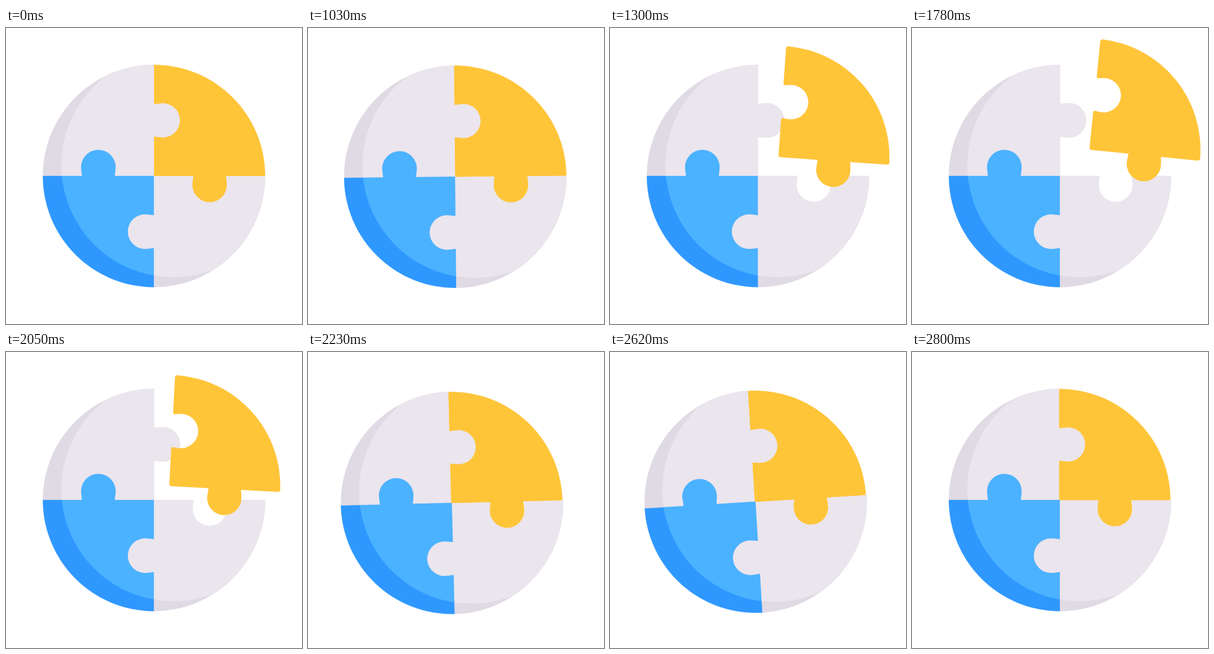
Animation, 500 px wide and 500 px high, one loop 2.83 s. Source, as an HTML page:

```html
<!DOCTYPE html>
<html lang="en">
<head>
<meta charset="utf-8">
<title>Puzzle circle</title>
<style>
  html, body { margin: 0; width: 100%; height: 100%; overflow: hidden; background: #fff; }
  svg { display: block; width: 100%; height: 100%; }

  .disc, .loose, .sharp { animation: 2830ms linear infinite; }
  .disc { animation-name: push, tilt; }
  .loose { animation-name: slide, turn; }
  .sharp { animation-name: corners; animation-timing-function: step-end; }

  .grey { fill: #ebe5ed; stroke: #ebe5ed; }
  .grey-dark { fill: #e0dae4; stroke: #e0dae4; }
  .blue { fill: #4bb2ff; stroke: #4bb2ff; }
  .blue-dark { fill: #2f98ff; stroke: #2f98ff; }
  .fixed { stroke-width: .4; }
  .loose { fill: #ffc539; }

  /* the disc winds up, springs back, then is knocked by the returning piece */
  @keyframes push {
    0% { translate: 0 0; }
    35.34% { translate: 0 0; animation-timing-function: cubic-bezier(.37, 0, .63, 1); }
    40.28% { translate: -12px 12px; animation-timing-function: cubic-bezier(.37, 0, .63, 1); }
    44.88% { translate: 0 0; }
    77.03% { translate: 0 0; animation-timing-function: cubic-bezier(.33, .33, .67, 1); }
    83.92% { translate: -22px 16px; animation-timing-function: cubic-bezier(.37, 0, .63, 1); }
    95.94%, 100% { translate: 0 0; }
  }
  @keyframes tilt {
    0% { rotate: 0deg; }
    35.34% { rotate: 0deg; animation-timing-function: cubic-bezier(.37, 0, .63, 1); }
    40.28% { rotate: -5.5deg; animation-timing-function: cubic-bezier(.37, 0, .63, 1); }
    44.88% { rotate: 0deg; }
    77.03% { rotate: 0deg; animation-timing-function: cubic-bezier(.33, .1, .67, 1); }
    85.87% { rotate: -10deg; animation-timing-function: cubic-bezier(.37, 0, .63, 1); }
    97.17%, 100% { rotate: 0deg; }
  }

  /* the yellow piece, relative to the disc */
  @keyframes slide {
    0% { translate: 0 0; }
    40.64% { translate: 0 0; animation-timing-function: cubic-bezier(.4, .1, .7, .85); }
    45.94% { translate: 34.5px -32px; animation-timing-function: cubic-bezier(.33, .67, .67, 1); }
    55.12% { translate: 52px -46.5px; animation-timing-function: cubic-bezier(.333, 0, .667, 0); }
    77.03%, 100% { translate: -1.3px .2px; }
  }
  @keyframes turn {
    0% { rotate: 0deg; }
    40.64% { rotate: 0deg; animation-timing-function: cubic-bezier(.4, .1, .7, .85); }
    45.94% { rotate: 4deg; animation-timing-function: cubic-bezier(.33, .67, .67, 1); }
    55.12% { rotate: 6deg; animation-timing-function: cubic-bezier(.333, 0, .667, 0); }
    77.03%, 100% { rotate: 0deg; }
  }
  /* square corners show only while the piece is in place */
  @keyframes corners {
    0% { opacity: 1; }
    41% { opacity: 0; }
    77.03%, 100% { opacity: 1; }
  }
</style>
</head>
<body>
<svg viewBox="-250 -250 500 500">
  <defs>
    <path id="piece" d="M0-187.7A187.7 187.7 0 0 1 187.7 0H121.5L122.72 11A29 29 0 1 1 65.28 11L66.5 0H0V-66.5L11-65.28A29 29 0 1 0 11-122.72L0-121.5Z"/>
    <path id="rounded" d="M0-183.5Q0-187.7 4-187.66A187.7 187.7 0 0 1 187.66-4Q187.7 0 183.7 0H121.5L122.72 11A29 29 0 1 1 65.28 11L66.5 0H4Q0 0 0-4V-63Q0-66.5 3-66.17L11-65.28A29 29 0 1 0 11-122.72L3-121.83Q0-121.5 0-125Z"/>
    <clipPath id="lit"><circle cx="32.5" cy="-18" r="189"/></clipPath>
  </defs>
  <g class="disc">
    <g class="fixed">
      <use href="#piece" class="grey-dark" transform="rotate(-90)"/>
      <use href="#piece" class="blue-dark" transform="rotate(180)"/>
      <use href="#piece" class="grey-dark" transform="rotate(90)"/>
    </g>
    <g class="fixed" clip-path="url(#lit)">
      <use href="#piece" class="grey" transform="rotate(-90)"/>
      <use href="#piece" class="blue" transform="rotate(180)"/>
      <use href="#piece" class="grey" transform="rotate(90)"/>
    </g>
    <g class="loose">
      <use href="#rounded"/>
      <use href="#piece" class="sharp"/>
    </g>
  </g>
</svg>
<script>
  // Hold still for REST ms, then advance the keyframes in even steps.
  const LOOP = 2830, REST = 1030, STEP = 30;
  const parts = document.getAnimations();
  const start = performance.now();
  parts.forEach(p => p.pause());

  function draw() {
    const t = (performance.now() - start) % LOOP;
    const at = t < REST ? 0 : REST + Math.floor((t - REST) / STEP) * STEP;
    parts.forEach(p => { p.currentTime = at; });
    requestAnimationFrame(draw);
  }
  draw();
</script>
</body>
</html>
```
